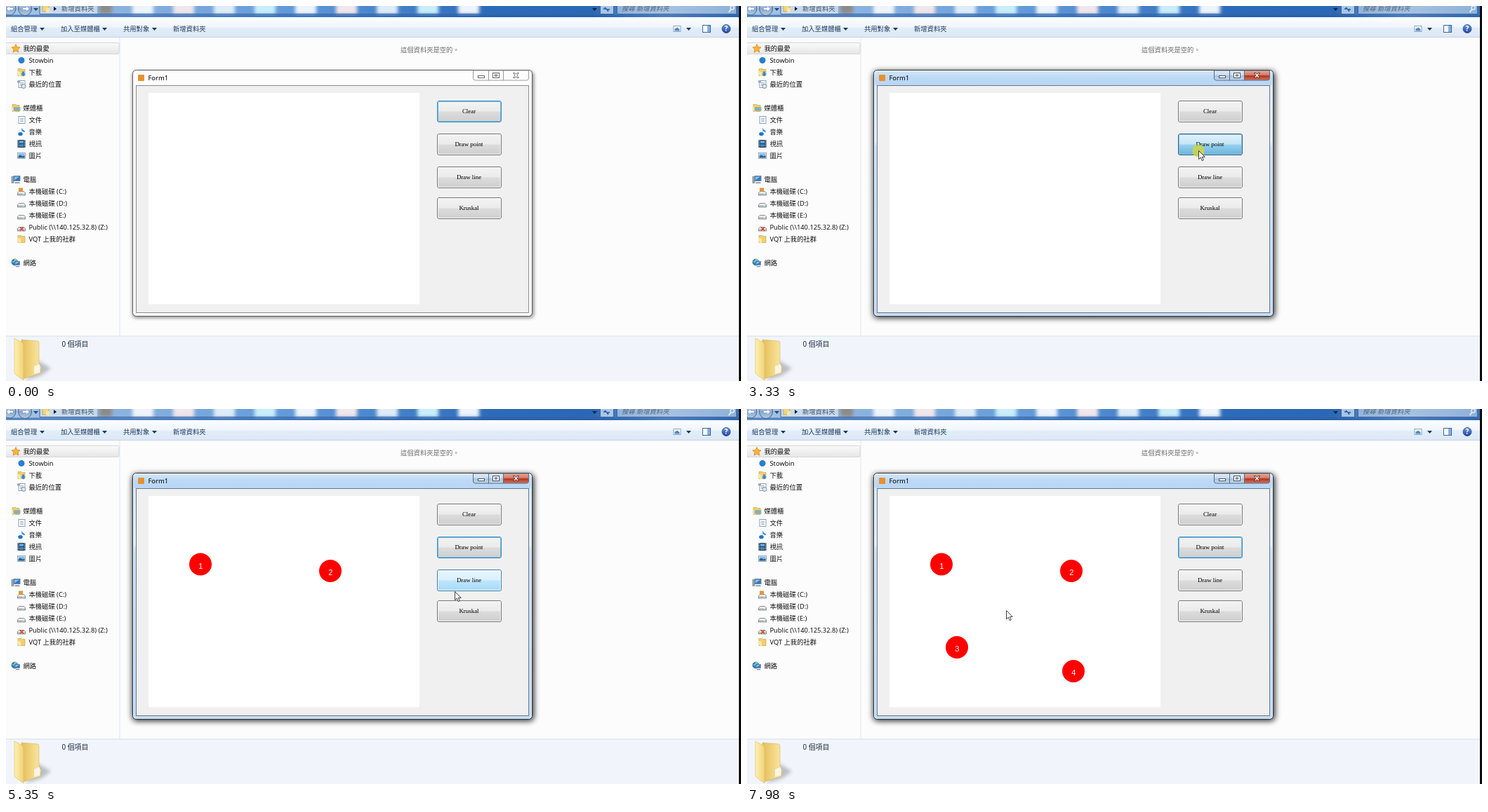
These frames come from a looping animation (1047x535 px, 8 s). An HTML page:

```html
<!DOCTYPE html>
<html lang="zh-TW">
<head>
<meta charset="utf-8">
<title>Form1</title>
<style>
html, body { margin: 0; width: 100%; height: 100%; overflow: hidden; background: #fcfcfc; }
svg { display: block; width: 100%; height: 100%; }
text { font-family: "Noto Sans", "Noto Sans CJK TC", "Noto Sans CJK JP", "Noto Sans CJK", sans-serif; font-size: 9.3px; fill: #111; white-space: pre; }
.caption { font-family: "Liberation Serif", serif; font-size: 8.9px; text-anchor: middle; fill: #000; }
.num { font-family: "Liberation Sans", sans-serif; font-size: 11px; text-anchor: middle; fill: #fff; }
</style>
</head>
<body>
<svg id="stage" viewBox="0 0 1047 535" preserveAspectRatio="none"></svg>
<script>
const LOOP = 8000;
const stage = document.getElementById('stage');

const rect = (x, y, w, h, fill, more = '') =>
  `<rect x="${x}" y="${y}" width="${w}" height="${h}" fill="${fill}" ${more}/>`;
const path = (d, fill, more = '') => `<path d="${d}" fill="${fill}" ${more}/>`;
const disc = (x, y, r, fill, more = '') => `<circle cx="${x}" cy="${y}" r="${r}" fill="${fill}" ${more}/>`;
const text = (x, y, s, more = '') => `<text x="${x}" y="${y}" ${more}>${s}</text>`;
const at = (x, y, body) => `<g transform="translate(${x} ${y})">${body}</g>`;
const line = (color, width = 1) => `stroke="${color}" stroke-width="${width}"`;

// stops: "color offset, color offset, ..."
function grad(id, stops, across) {
  const list = stops.split(',').map(s => {
    const [color, offset] = s.trim().split(' ');
    return `<stop offset="${offset}%" stop-color="${color}"/>`;
  }).join('');
  return `<linearGradient id="${id}" x1="0" y1="0" x2="${across ? 1 : 0}" y2="${across ? 0 : 1}">${list}</linearGradient>`;
}

const blur = (id, size) =>
  `<filter id="${id}" x="-40%" y="-60%" width="180%" height="220%"><feGaussianBlur stdDeviation="${size}"/></filter>`;

const defs = `<defs>
${grad('glass', '#a9c6e6 0, #8db4e0 14, #5f98d8 40, #2c6bba 66, #2a68b6 80, #7ea8d8 90, #3a74bb 100', true)}
${grad('bar', '#fbfdff 0, #f0f6fd 48, #e2edf9 52, #dbe8f6 100')}
${grad('row', '#fafafa 0, #e6e6e6 100')}
${grad('normal', '#f3f3f3 0, #ebebeb 49, #dcdcdc 51, #cecece 100')}
${grad('hover', '#eaf6fd 0, #d9f0fc 49, #bee6fd 51, #a7d9f5 100')}
${grad('down', '#e2f2fb 0, #c4e5f6 49, #98d1ef 51, #68b3db 100')}
${grad('title', '#d3e5f8 0, #bcd9f6 45, #b8d7f6 100')}
${grad('side', '#d6e7f9 0, #e4effa 29, #c9e0f6 31, #bfdaf4 100')}
${grad('cap', '#e2edf8 0, #c8daed 48, #a9c3df 52, #c3d7ec 100')}
${grad('close', '#e6ab9d 0, #d07864 48, #b4321c 52, #d0765c 100')}
${grad('lid', '#fff0b0 0, #f0d37c 100', true)}
${grad('body', '#e3bd58 0, #f3d987 60, #f8e7aa 100', true)}
${grad('orb', '#e9f1fa 0, #88a6c9 50, #b5cde6 100')}
${grad('help', '#6f9fe0 0, #1c3f9c 100')}
${blur('soft', 2.5)}${blur('shade', 4.5)}${blur('faint', 2.5)}
<clipPath id="strip"><rect width="1044" height="14"/></clipPath>
</defs>`;

const arrow = (x, y, color = '#1e395b') => path(`M${x} ${y}h7l-3.5 4z`, color);

function topStrip() {
  const tints = ['#eef4fa', '#f1e6ea', '#dfecf8', '#c9eefa'];
  let blobs = rect(133, -6, 18, 17, '#8d8b88', 'filter="url(#soft)"');
  for (let i = 0; i < 9; i++) {
    blobs += rect(180 + 58 * i, -6, 30, 18, tints[i % 4], 'filter="url(#soft)"');
  }
  return rect(0, 0, 1044, 18, 'url(#glass)')
    + `<g clip-path="url(#strip)">${rect(48, -2, 82, 13, '#d3e1f1', 'opacity=".8"')}${blobs}</g>`
    + rect(0, 12.5, 1044, 3, '#255f aa'.replace(' ', ''), 'opacity=".65"')
    + disc(5, 4, 9, 'url(#orb)', line('#44658e')) + disc(27, 4, 9.5, 'url(#orb)', line('#44658e'))
    + path('M1 4l4-3v2h5v2h-5v2zM33 4l-4-3v2h-5v2h5v2z', '#fff')
    + arrow(39, 3, '#28466d')
    + path('M48 -1V11.5H866V-1M870 -1V11.5H1041V-1M846 0V11', 'none', line('#3d649a'))
    + rect(847, 0, 18, 11, '#c8daee', 'opacity=".8"') + rect(871, 0, 169, 11, '#bcd1e8', 'opacity=".65"')
    + rect(52, -2, 9, 10, '#f2d67d', line('#b38f35', .6)) + path('M57 3h5v6h-5z', '#f8e7a8')
    + path('M68 1l4 3-4 3z', '#111') + arrow(835, 3, '#14233b')
    + path('M851 4h4l-2-2M860 5h-4l2 3', 'none', line('#1c5ba8', 1.4))
    + text(79, 6.5, '新增資料夾', 'style="fill:#465365"')
    + text(877, 6.5, '搜尋 新增資料夾', 'font-style="italic" style="fill:#53657b"')
    + disc(1034.5, 2.5, 2.7, 'none', line('#eaf3ff', 1.3)) + path('M1032.5 5l-3 4', 'none', line('#eaf3ff', 1.6));
}

function toolbar() {
  const ink = 'style="fill:#1e395b"';
  return rect(0, 16, 1044, 29, 'url(#bar)') + rect(0, 44, 1044, 1, '#c3d1e2')
    + text(7, 36, '組合管理', ink) + arrow(48, 31)
    + text(78, 36, '加入至媒體櫃', ink) + arrow(137, 31)
    + text(167, 36, '共用對象', ink) + arrow(208, 31)
    + text(238, 36, '新增資料夾', ink)
    + rect(951, 28.5, 10, 8, '#fff', line('#8ba3c0')) + path('M952.5 35.5v-3l4-2 3 3v2z', '#4f8bc4') + arrow(969, 31)
    + rect(992.5, 27.5, 11, 10, '#fff', line('#3e6597')) + rect(999, 28, 4, 9, '#7fb0e2')
    + disc(1026, 32.5, 6, 'url(#help)', line('#29468a', .8))
    + text(1026, 36.3, '?', 'text-anchor="middle" style="fill:#fff;font-size:10px;font-weight:700"');
}

// Icons are drawn around their own centre.
const page = rect(-4, -5, 9, 10, '#fff', line('#8494a8', .9)) + path('M-2 -2h5M-2 0h5M-2 2h5', 'none', line('#7f9bbd', .8));
const folder = path('M-5 -5h5l1 1h4v9h-10z', '#f0cf6f', line('#c39c40', .6)) + path('M-5 -2l4 2v6l-4-2z', '#fae9a8');
const drive = path('M-5.5 2l2-2h7l2 2v3.5h-11z', '#eceef0', line('#6d7279', .8)) + path('M-5 3.8h7', 'none', line('#8b9097')) + rect(3, 3.2, 1.5, 1.2, '#64b054');
const screen = rect(-3, -5, 9, 7, '#2f78c4', line('#6f7d8d', .9)) + path('M-2 -4h7l-7 5z', '#83c1ef') + path('M-1 4h6l1 1.5h-8z', '#7c8794');
const icons = {
  star: path('M0 -6L1.8 -2 6 -1.6 2.9 1.4 3.8 5.6 0 3.4 -3.8 5.6 -2.9 1.4 -6 -1.6 -1.8 -2z', '#fbb634', line('#d07a12', .7)),
  dot: disc(0, 0, 4.5, '#2580d0'),
  load: folder + path('M1 -1h3v3h2l-3.5 4L-1 2h2z', '#2e8ade'),
  recent: page + path('M-6 -5h4v3h-4z', '#9aa9ba') + disc(3, 3, 3, '#dce9f5', line('#6a7b90', .8)),
  library: folder + rect(-3, -1, 9, 5, '#6cb4e6', line('#d6a842', .8)),
  page,
  music: path('M0 -6q1 3 5 5l-1 2q-2-2-3-2v4', '#2f8ce0') + `<ellipse cx="-1.5" cy="3" rx="3.3" ry="2.6" fill="#1e74cf"/>`,
  film: rect(-5.5, -5.5, 11, 11, '#1f3246') + rect(-3, -4.5, 6, 4, '#56a6e2') + rect(-3, .5, 6, 4, '#3f86c4')
    + path('M-4.3 -5v10M4.3 -5v10', 'none', line('#dfe8f0', 1.2) + ' stroke-dasharray="1.2 1.2"'),
  photo: rect(-5.5, -4, 11, 8, '#fff', line('#8794a5', .8)) + rect(-4.5, -3, 9, 6, '#7cbbe8') + path('M-4.5 3v-2l3-2 3 2 3-1v3z', '#2e5f8c'),
  pc: screen + rect(-6, -4, 3, 9, '#9aa7b5', line('#66727f', .6)),
  system: drive + rect(-4, -5, 6, 5, '#e5963a'),
  drive,
  share: drive + path('M-2 0l5 5M3 0l-5 5', 'none', line('#dd3a22', 1.6)),
  folder,
  net: disc(-1.5, -1, 4.5, '#2f7fc8', line('#23639f', .7)) + path('M-5 -2q3 2 4-3q1 2 3 1', 'none', line('#a7dd9e', 1.3)) + at(1, 1.5, `<g transform="scale(.75)">${screen}</g>`)
};

// One entry per line of the tree; null leaves a gap, "top" entries sit further left.
const tree = [
  ['star', '我的最愛', 'top'], ['dot', 'Stowbin'], ['load', '下載'], ['recent', '最近的位置'], null,
  ['library', '媒體櫃', 'top'], ['page', '文件'], ['music', '音樂'], ['film', '視訊'], ['photo', '圖片'], null,
  ['pc', '電腦', 'top'], ['system', '本機磁碟 (C:)'], ['drive', '本機磁碟 (D:)'], ['drive', '本機磁碟 (E:)'],
  ['share', 'Public (\\\\140.125.32.8) (Z:)'], ['folder', 'VQT 上我的社群'], null,
  ['net', '網路', 'top']
];

function sidebar() {
  const rows = tree.map((item, i) => {
    if (!item) return '';
    const [icon, label, top] = item;
    const y = 60 + 17 * i;
    return at(top ? 14 : 22, y + .5, icons[icon]) + text(top ? 24.5 : 32.5, y + 3.6, label);
  });
  return rect(161.5, 45, 1, 426, '#d9e5f2')
    + rect(-2, 52.5, 163, 16, 'url(#row)', line('#d5d5d5') + ' rx="2"')
    + rows.join('');
}

function details() {
  return rect(0, 471, 1044, 64, '#f1f5fb') + rect(0, 470.5, 1044, 1, '#d6dfea')
    + path('M46 506L64 517 50 527 28 534z', '#8c929b', 'opacity=".55" filter="url(#soft)"')
    + path('M22 476l23 2q2 0 2 3v29l3 5-1 9-25 8z', 'url(#body)', line('#d2a94b', .5))
    + path('M40 514l8-3v11l-8 3z', '#f9f6e8')
    + path('M12 474l11 6q2 1 2 4v50l-11-8q-2-1-2-4z', 'url(#lid)', line('#dcb964', .6))
    + text(79.5, 485.5, '0 個項目', 'style="font-size:9.9px;fill:#1e2d44"');
}

function formWindow(active) {
  const shade = active ? 'filter="url(#shade)" opacity=".85"' : 'filter="url(#faint)" opacity=".45"';
  const rule = line(active ? '#5c6c80' : '#9a9a9a');
  const glyph = line(active ? '#4a5462' : '#666');
  const cap = active ? 'url(#cap)' : '#fdfdfd';
  const fill = active ? '#fff' : '#fdfdfd';
  return rect(180, 93, 572, 352, '#000', shade + ' rx="6"')
    + rect(180.5, 91.5, 569, 351, active ? 'url(#side)' : '#fdfdfd', line(active ? '#2a333d' : '#5c5c5c') + ' rx="5"')
    + (active ? rect(182, 93, 566, 21, 'url(#title)', 'rx="4"')
      + rect(181.5, 92.5, 567, 349, 'none', line('#eef6ff', .9) + ' rx="4"') : '')
    + rect(185.5, 113.5, 559, 324, '#f0f0f0', line(active ? '#6a7888' : '#8c8c8c'))
    + rect(203, 124, 386, 301.5, '#fff')
    + rect(188, 98, 9, 9, '#e8902f', 'rx="1"')
    + text(202.5, 106, 'Form1', 'style="font-size:9.4px;fill:#000"')
    + path('M665.5 92V103q0 3 3 3H687.5V92z', cap, rule)
    + rect(687.5, 92, 21, 14, cap, rule)
    + path('M708.5 92V106H741.5q3 0 3-3V92z', active ? 'url(#close)' : cap, rule)
    + rect(672.5, 99.5, 9, 3, fill, glyph)
    + rect(693.5, 95.5, 9, 7, fill, glyph) + rect(696.5, 98, 3, 2, fill, glyph)
    + path('M722.5 95.5h2.5l1.5 2 1.5-2h2.5l-2.5 3.5 2.5 3.5h-2.5l-1.5-2-1.5 2h-2.5l2.5-3.5z', fill, line(active ? '#5b2a25' : '#666', .9));
}

const buttons = [['Clear', 135], ['Draw point', 182], ['Draw line', 229], ['Kruskal', 273]];

function button([label, y], focus, state) {
  const border = { normal: focus ? '#3c8ac0' : '#757575', hover: '#3c7fb1', down: '#2c628b' }[state];
  const inner = state === 'down' ? '#8fc0da' : focus ? '#62bbe8' : '#fafafa';
  return rect(614.5, y + .5, 91, 30, `url(#${state})`, line(border) + ' rx="2.5"')
    + rect(615.5, y + 1.5, 89, 28, 'none', line(inner, .9) + ' rx="1.5"')
    + text(659.5, y + 18, label, 'class="caption"');
}

const ACTIVATE = 3330;

// Left, top, time of appearance
const nodes = [[261, 205.5, 4020], [446, 215, 4950], [283, 324, 6420], [449, 358, 7290]];
const node = ([x, y], i) => disc(x + 16, y + 16, 16, '#f00') + text(x + 16.2, y + 22.3, i + 1, 'class="num"');

// Mouse button held: from, until
const clicks = [[ACTIVATE, 3410], [3940, 4020], [4870, 4950], [7120, 7290]];

// Pointer moves: start, end, x and y reached
const ENTER = 70;
const home = [889, 453];
const moves = [
  [ENTER, 600, 579, 226], [600, 990, 643, 206], [3484, 3790, 261, 205], [4114, 4660, 446, 215],
  [5044, 5343, 639, 260], [5343, 5640, 640, 247], [5734, 6190, 283, 324], [6514, 6850, 488, 349],
  [6894, 7050, 449, 358], [7214, 7700, 328, 292], [7700, 7930, 369, 287]
];

const STEP = 76.5;
const ease = p => p * p * (3 - 2 * p);

function tip(t) {
  let [x, y] = home;
  for (const [start, end, toX, toY] of moves) {
    if (t < start) break;
    const sampled = Math.floor((t - start + 10) / STEP) * STEP;
    const p = ease(Math.min(1, sampled / (end - start)));
    x += (toX - x) * p;
    y += (toY - y) * p;
  }
  return [Math.round(x), Math.round(y)];
}

const pointer = path('M.5 .5V12.7L3.3 10.1 5.3 14.7 7.3 13.8 5.3 9.4H9.2z', '#fff', line('#26282e', .9) + ' stroke-linejoin="round"');

stage.innerHTML = defs + rect(0, 0, 1047, 535, '#fcfcfc') + topStrip() + toolbar() + sidebar() + details()
  + text(562, 65.7, '這個資料夾是空的。', 'style="fill:#6d6d6d"')
  + rect(1044, 0, 3, 535, '#0a0a0a') + '<g id="form"></g><g id="live"></g>';
const form = document.getElementById('form');
const live = document.getElementById('live');
let wasActive = null;

function draw(t) {
  const active = t >= ACTIVATE;
  if (active !== wasActive) {
    form.innerHTML = formWindow(active);
    wasActive = active;
  }
  const shown = t >= ENTER;
  const [x, y] = tip(t);
  const pressed = clicks.some(([from, until]) => t >= from && t < until);
  const body = buttons.map((b, i) => {
    const over = shown && x >= 614 && x <= 706 && y >= b[1] && y <= b[1] + 31;
    return button(b, i === (active ? 1 : 0), over ? (pressed ? 'down' : 'hover') : 'normal');
  });
  nodes.forEach((n, i) => { if (t >= n[2]) body.push(node(n, i)); });
  if (pressed) body.push(disc(x, y + .5, 9, '#d2d640', 'opacity=".8"'));
  if (shown) body.push(at(x, y, pointer));
  live.innerHTML = body.join('');
}

const origin = performance.now();
function tick() {
  draw((performance.now() - origin) % LOOP);
  requestAnimationFrame(tick);
}
draw(0);
tick();
</script>
</body>
</html>
```
